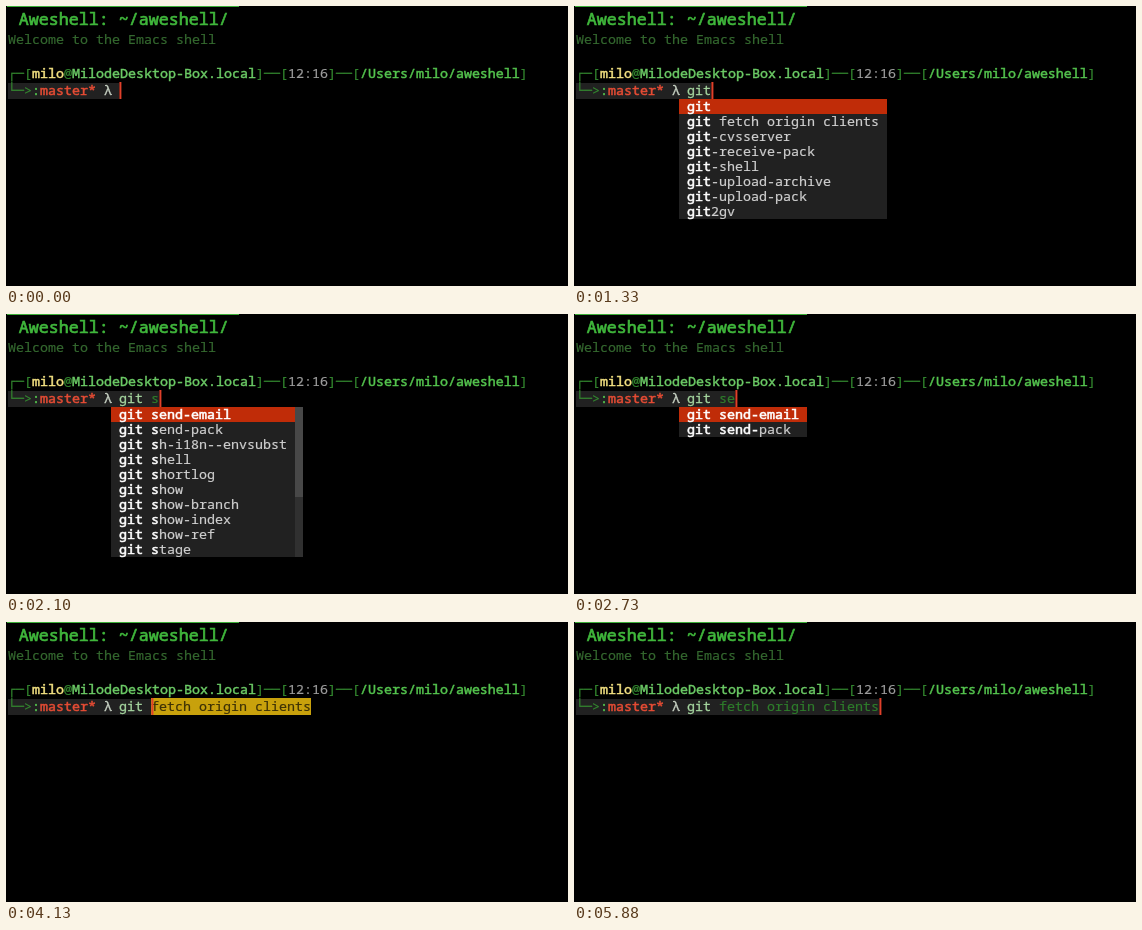
An HTML page that plays this animation: 562 px wide and 280 px high, repeating every 6230 ms.

```html
<!DOCTYPE html>
<html lang="en">
<head>
<meta charset="utf-8">
<title>Shell completion</title>
<style>
  html, body { margin: 0; width: 100%; height: 100%; overflow: hidden; background: #000; }
  svg { display: block; width: 562px; height: 280px; }
  text { font: 13.3333px "Noto Sans Mono", "DejaVu Sans Mono", monospace; white-space: pre; }
  /* a thin outline gives the slightly heavy weight of the terminal face */
  text, tspan { fill: currentColor; stroke: currentColor; stroke-width: .2px; }
  .title { font-size: 16.6667px; color: #40b83c; stroke-width: .7px; }
  .dim { color: #34682f; }
  .line { color: #348a30; }
  .user { color: #f4e282; stroke-width: .5px; }
  .host { color: #6ccb66; stroke-width: .45px; }
  .time { color: #9c9c9c; }
  .path { color: #54c44e; stroke-width: .5px; }
  .branch { color: #e64c34; stroke-width: .5px; }
  .sign { color: #c8d2c4; stroke-width: .3px; }
  .bad { color: #b82a12; }
  .cmd { color: #a4d49e; stroke-width: .3px; }
  .arg { color: #2e7d2b; }
  .ghost { color: #3d3106; }
  .item { color: #cfcfcf; }
  .match { color: #fff; stroke-width: .6px; }
</style>
</head>
<body>
<svg viewBox="0 0 562 280">
  <rect width="562" height="280"/>
  <rect x="1" width="232" height="1" fill="#3cae38"/>
  <text class="title" x="12.8" y="19">Aweshell: ~/aweshell/</text>
  <text class="dim" x="2" y="38">Welcome to the Emacs shell</text>
  <text class="line" x="2" y="72">┌─[<tspan class="user">milo</tspan>@<tspan class="host">MilodeDesktop-Box.local</tspan>]──[<tspan class="time">12:16</tspan>]──[<tspan class="path">/Users/milo/aweshell</tspan>]</text>
  <g id="live"></g>
</svg>
<script>
const LOOP = 6230, CELL = 8, LEFT = 113, POP_X = 105, POP_Y = 93, ROW = 15;
const live = document.getElementById('live');

// match: highlighted prefix length; thumb: scrollbar thumb height in rows
const menus = {
  g: { match: 1, thumb: 1, items: ['g++', 'g++-6', 'g[', 'gapplication', 'gatherheaderdoc',
    'gb2sum', 'gbase32', 'gbase64', 'gbasename', 'gbklatex'] },
  git: { match: 3, items: ['git', 'git fetch origin clients', 'git-cvsserver', 'git-receive-pack',
    'git-shell', 'git-upload-archive', 'git-upload-pack', 'git2gv'] },
  s: { match: 5, thumb: 6, items: ['git send-email', 'git send-pack', 'git sh-i18n--envsubst',
    'git shell', 'git shortlog', 'git show', 'git show-branch', 'git show-index', 'git show-ref', 'git stage'] },
  se: { match: 9, items: ['git send-email', 'git send-pack'] }
};

const rest = 'fetch origin clients';
const steps = [
  { at: 0, typed: '' },
  { at: 70, typed: 'g' },
  { at: 210, typed: 'g', menu: 'g' },
  { at: 1190, typed: 'gi', menu: 'git' },
  { at: 1260, typed: 'git', menu: 'git' },
  { at: 1610, typed: 'git ', ghost: rest },
  { at: 1890, typed: 'git s' },
  { at: 1960, typed: 'git s', menu: 's' },
  { at: 2660, typed: 'git se', menu: 'se' },
  { at: 3850, typed: 'git s', menu: 's' },
  { at: 3990, typed: 'git ', ghost: rest },
  { at: 5180, typed: 'git ' + rest }
];

const rect = (x, y, w, h, fill) =>
  `<rect x="${x}" y="${y}" width="${w}" height="${h}" fill="${fill}"/>`;
const span = (cls, s) => `<tspan class="${cls}">${s}</tspan>`;
const text = (x, y, body) => `<text x="${x}" y="${y}">${body}</text>`;

function drawMenu({ match, thumb, items }) {
  const w = (Math.max(...items.map(s => s.length)) + 2) * CELL;
  const h = items.length * ROW;
  let out = rect(POP_X, POP_Y, w, h, '#212121') + rect(POP_X, POP_Y, w, ROW, '#c02c08');
  if (thumb) {
    out += rect(POP_X + w, POP_Y, CELL, h, '#303030') +
           rect(POP_X + w, POP_Y, CELL, thumb * ROW, '#484848');
  }
  items.forEach((s, i) => {
    const n = i ? match : s.length;
    out += text(LEFT, POP_Y + 12 + i * ROW, span('match', s.slice(0, n)) + span('item', s.slice(n)));
  });
  return out;
}

function drawStep({ typed, menu, ghost }) {
  const end = LEFT + typed.length * CELL;
  const cmd = typed.slice(0, 3);
  let out = rect(2, 77, end - 2, 16, '#212121');
  if (ghost) out += rect(end, 76, ghost.length * CELL, 17, '#c8a10c');
  out += text(2, 89, span('line', '└─>') + span('path', ':') + span('branch', 'master*') + span('sign', ' λ'));
  out += text(LEFT, 89, span(cmd === 'git' ? 'cmd' : 'bad', cmd) +
    span('arg', typed.slice(3)) + span('ghost', ghost || ''));
  out += rect(end + .4, 76, 2, 17, '#e0402a');
  return out + (menu ? drawMenu(menus[menu]) : '');
}

let shown;
function frame() {
  const t = performance.now() % LOOP;
  const step = steps.filter(s => s.at <= t).pop();
  if (step !== shown) {
    live.innerHTML = drawStep(step);
    shown = step;
  }
  requestAnimationFrame(frame);
}
frame();
</script>
</body>
</html>
```
